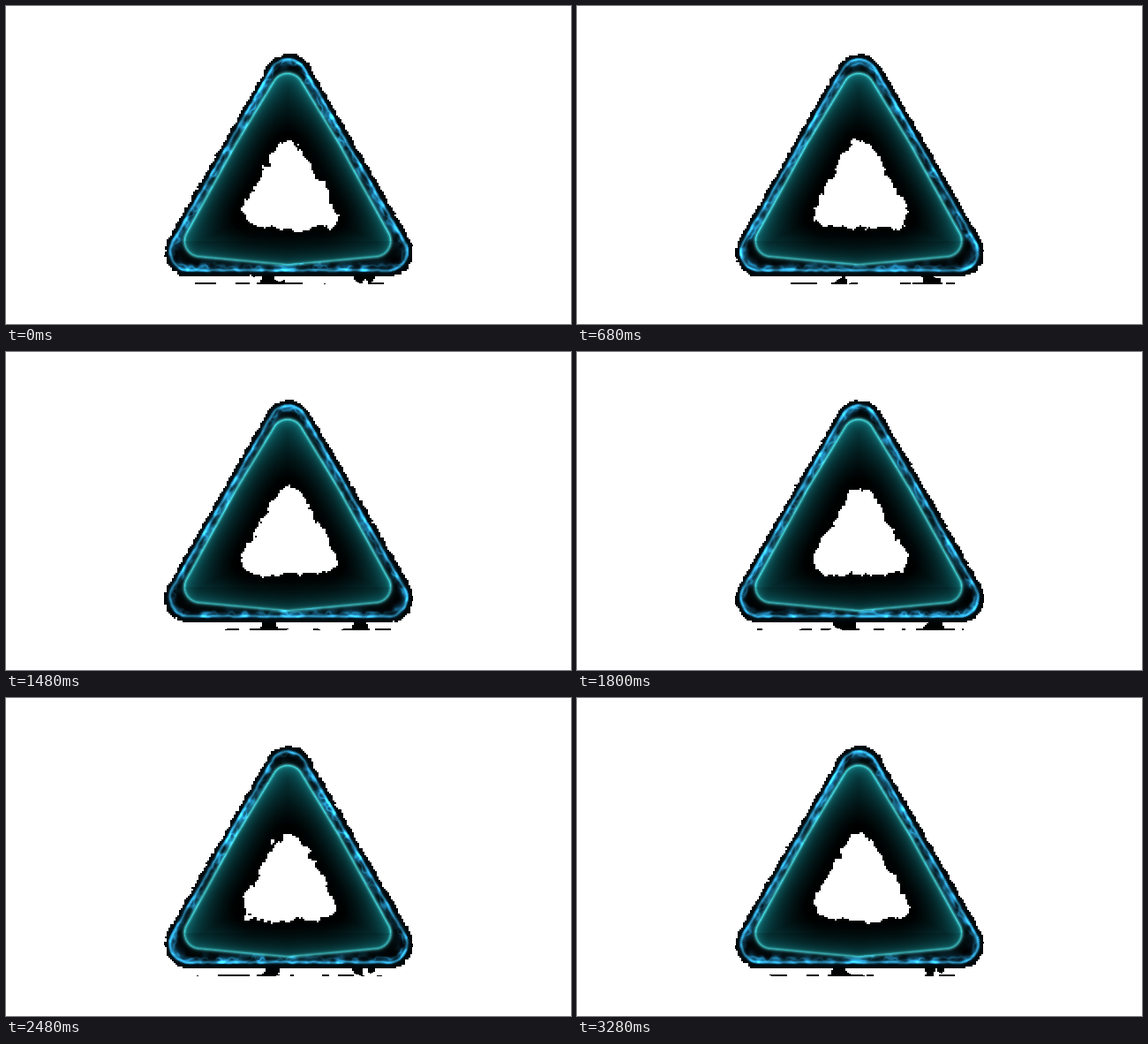
Write an HTML page with a canvas that moves like this. It is 640 by 360 pixels and loops after 3.32 s.

```html
<!DOCTYPE html>
<html>
<head>
<meta charset="utf-8">
<title>Electric triangle</title>
<style>
html, body { margin: 0; width: 100%; height: 100%; overflow: hidden; background: #fff; }
canvas { display: block; }
</style>
</head>
<body>
<canvas id="stage" width="640" height="360"></canvas>
<script>
const W = 640, H = 360, X0 = 179, X1 = 461, Y0 = 54, Y1 = 315;
const STEP = 40, FRAMES = 83, POSES = 81, DEPTH = 27;
const ctx = document.getElementById('stage').getContext('2d');
const img = ctx.createImageData(W, H);
const px = img.data;

// Signed distance to a polygon whose corners are rounded by r
function distance(pts, r, x, y) {
  let best = Infinity, inside = false;
  pts.forEach(([ax, ay], i) => {
    const [bx, by] = pts[(i + 1) % pts.length];
    const ex = bx - ax, ey = by - ay, wx = x - ax, wy = y - ay;
    const u = Math.max(0, Math.min(1, (wx * ex + wy * ey) / (ex * ex + ey * ey)));
    best = Math.min(best, Math.hypot(wx - ex * u, wy - ey * u));
    if ((ay > y) !== (by > y) && x < ax + ex * wy / ey) inside = !inside;
  });
  return (inside ? -best : best) - r;
}

function field(pts, r) {
  const f = new Float32Array(W * H);
  for (let y = Y0; y < Y1; y++)
    for (let x = X0; x < X1; x++) f[y * W + x] = distance(pts, r, x + 0.5, y + 0.5);
  return f;
}

const outer = field([[319.5, 82], [433, 278], [207, 278]], 22);
const inner = field([[319, 94], [362, 165], [418, 266], [319, 275], [220, 266], [276, 165]], 18);
const hole = field([[320, 171], [357, 234], [285, 234]], 17);

function hash(x, y, z) {
  let h = Math.imul(x, 374761393) ^ Math.imul(y, 668265263) ^ Math.imul(z, 1274126177);
  h = Math.imul(h ^ (h >>> 15), 2246822519);
  h = Math.imul(h ^ (h >>> 13), 3266489917);
  return ((h ^ (h >>> 16)) >>> 0) / 4294967296;
}

const ease = v => v * v * (3 - 2 * v);
const mix = (a, b, v) => a + (b - a) * v;
const bell = v => Math.exp(-v * v);
const clamp = v => Math.max(0, Math.min(1, v));

// Value noise in 0..1 that repeats in z so the loop closes
function noise(x, y, z) {
  const ix = Math.floor(x), iy = Math.floor(y), iz = Math.floor(z);
  const u = ease(x - ix), v = ease(y - iy);
  const plane = k => mix(
    mix(hash(ix, iy, k), hash(ix + 1, iy, k), u),
    mix(hash(ix, iy + 1, k), hash(ix + 1, iy + 1, k), u), v);
  return mix(plane(iz % DEPTH), plane((iz + 1) % DEPTH), ease(z - iz));
}

function isHole(i, x, y, z) {
  const d = hole[i];
  if (d > 8) return false;
  if (d < -8) return true;
  return d + (noise(x / 10, y / 10, z) - 0.5) * 9 + (noise(x / 2.5 + 90, y / 4, z) - 0.5) * 5 < 0;
}

function isBlack(i, x, y, z) {
  const d = outer[i];
  if (d < 4) return true;
  if (y < 306) return d < 8 && d + (noise(x / 3, y / 3 + 50, z) - 0.5) * 3 < 5.9;
  if (x < 203 || x > 436) return false;
  // Ragged feet and dashes below the base
  const foot = 0.7 * bell((x - 299) / 14) + 0.66 * bell((x - 403) / 14);
  const dash = y >= 313 ? 0.32 + 0.26 * (bell((x - 300) / 26) + bell((x - 405) / 26)) : 0;
  return noise(x / 9, y / 9 + 200, z) * 0.75 + Math.max(foot, dash) > 0.82;
}

function shade(i, x, y, z) {
  const din = inner[i], dout = outer[i];
  let r = 0, g = 0, b = 0;
  const add = (k, cr, cg, cb) => { r += k * cr; g += k * cg; b += k * cb; };
  const low = y > 265 ? 0.85 : 1;
  add(bell(din / 1.8) * low, 42, 85, 82);
  if (din < 0) {
    const rim = Math.max(0, 1 + din / 46);
    const far = clamp((hole[i] - 10) / 62);
    add((0.5 * rim * rim + 0.5 * far) * low, 8, 84, 90);
    add(Math.exp(din / 5) * low, 14, 46, 46);
  } else {
    add(Math.exp(-din / 2.5), 16, 75, 82);
  }
  if (din > -1 && dout > -18) {
    const wave = noise(x / 6, y / 6, z) - 0.5;
    const power = noise(x / 9 + 30, y / 9, z);
    const edge = dout + 0.8 + wave * 1.4;
    const arc = dout + 4 + (noise(x / 5 + 70, y / 5, z) - 0.5) * 9;
    const reach = Math.exp(Math.min(0, dout + 6) / 4);
    add(bell(edge / 1.6) * (0.5 + 0.4 * power), 55, 140, 170);
    add(Math.exp(-Math.abs(edge) / 3), 4, 38, 56);
    if (dout < 1) {
      add(bell(arc / 2.2) * power * reach, 25, 90, 120);
      add(ease(clamp(power * 2 - 0.6)) * reach, 12, 52, 72);
    }
  }
  return [r, g, b];
}

function draw(pose) {
  const z = pose * DEPTH / POSES;
  px.fill(255);
  for (let y = Y0; y < Y1; y++) {
    for (let x = X0; x < X1; x++) {
      // Silhouettes are cut on a coarse grid
      const cx = x & ~1, cy = y < 306 ? y & ~1 : y;
      const cell = Math.max(cy, Y0) * W + Math.max(cx, X0);
      if (!isBlack(cell, cx, cy, z) || isHole(cell, cx, cy, z)) continue;
      const i = y * W + x;
      const c = shade(i, x, y, z);
      px[i * 4] = c[0];
      px[i * 4 + 1] = c[1];
      px[i * 4 + 2] = c[2];
    }
  }
  ctx.putImageData(img, 0, 0);
}

let shown = -1;
function tick() {
  const n = Math.floor(performance.now() / STEP) % FRAMES;
  const pose = n <= 40 ? n : Math.max(40, n - 2); // short rest halfway
  if (pose !== shown) draw(shown = pose);
  requestAnimationFrame(tick);
}
tick();
</script>
</body>
</html>
```
